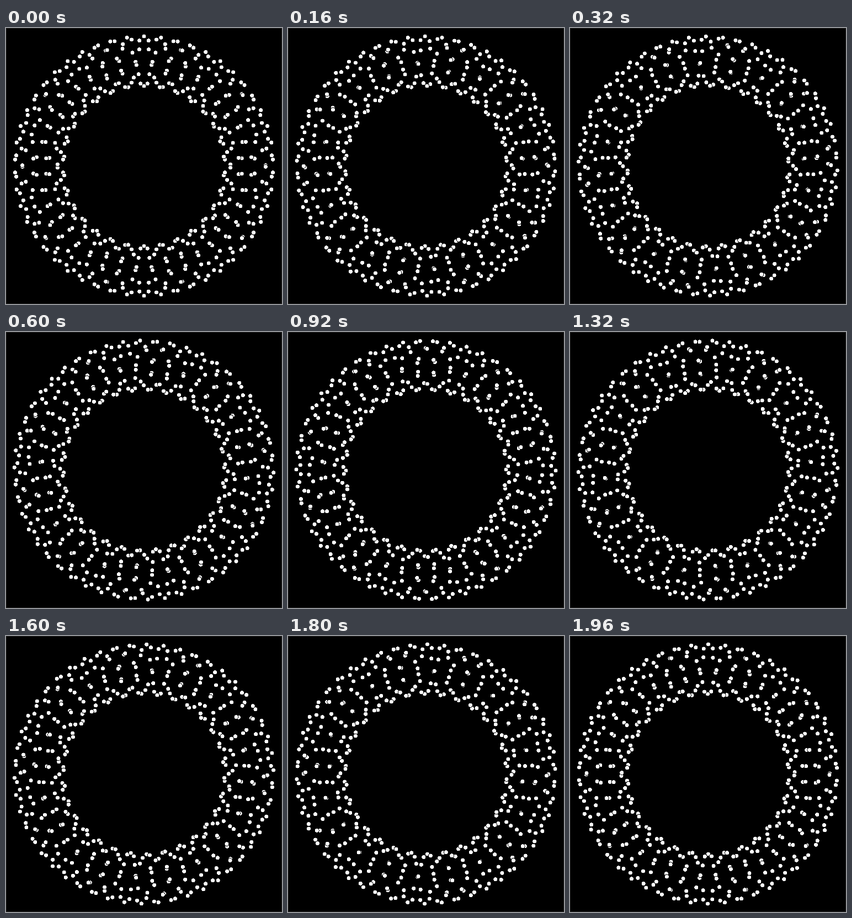
An HTML page with a canvas for the animation above (2000 ms loop, 500 px wide and 500 px high).

```html
<!DOCTYPE html>
<html lang="en">
<head>
<meta charset="utf-8">
<title>Ring of turning dots</title>
<style>
  html, body { margin: 0; width: 100%; height: 100%; overflow: hidden; background: #000; }
  /* The contrast keeps the small dots crisp. */
  canvas { display: block; filter: contrast(3); }
  body::after {
    content: ""; position: fixed; inset: 0;
    box-sizing: border-box; border: 1px solid #222;
  }
</style>
</head>
<body>
<canvas id="stage" width="500" height="500"></canvas>
<script>
  const ctx = document.getElementById('stage').getContext('2d');
  const TAU = Math.PI * 2;
  const LOOP = 2000, STEP = 40;
  const CENTER = 250, RING = 190, ORBIT = 45, DOT = 3.5, RIM = 4.5;
  const HUBS = 40, DOTS = 12;

  // Angles run counterclockwise from straight down.
  const polar = (x, y, radius, angle) =>
    [x + radius * Math.sin(angle), y + radius * Math.cos(angle)];

  function disc(x, y, radius, color) {
    ctx.fillStyle = color;
    ctx.beginPath();
    ctx.arc(x, y, radius, 0, TAU);
    ctx.fill();
  }

  function draw(progress) {
    ctx.fillStyle = '#000';
    ctx.fillRect(0, 0, 500, 500);
    for (let i = 0; i < HUBS; i++) {
      const hubAngle = TAU * i / HUBS;
      const [hx, hy] = polar(CENTER, CENTER, RING, hubAngle);
      // Each loop turns every orbit by one dot spacing.
      for (let j = 0; j < DOTS; j++) {
        const angle = hubAngle / 6 + TAU * (j + progress) / DOTS;
        const [x, y] = polar(hx, hy, ORBIT, angle);
        disc(x, y, RIM, '#000');
        disc(x, y, DOT, '#fff');
      }
    }
  }

  const start = performance.now();
  function tick() {
    const time = (performance.now() - start) % LOOP;
    draw(Math.floor(time / STEP) * STEP / LOOP);
    requestAnimationFrame(tick);
  }
  tick();
</script>
</body>
</html>
```
